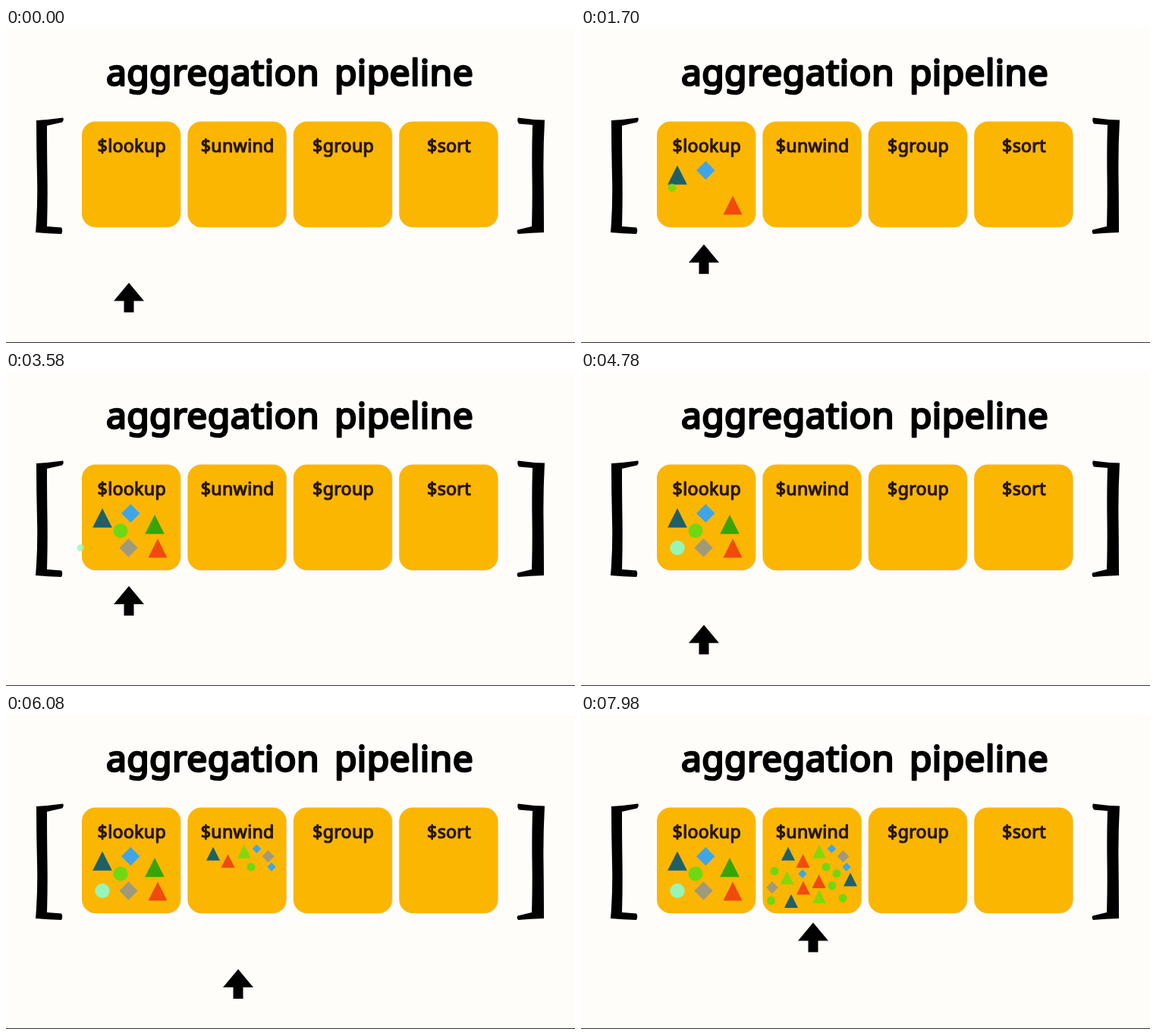
An HTML page for the animation above (8000 ms loop, 750 by 416 pixels).

```html
<!DOCTYPE html>
<html lang="en">
<head>
<meta charset="utf-8">
<title>Aggregation pipeline</title>
<style>
  html, body { margin: 0; width: 100%; height: 100%; overflow: hidden; background: #fefdfa; }
  svg { display: block; width: 100%; height: 100%; }
  text {
    font-family: "Noto Sans", "Open Sans", sans-serif;
    font-weight: 400;
    text-anchor: middle;
    stroke-linejoin: round;
  }
  .title { font-size: 48px; letter-spacing: .4px; word-spacing: 7px; fill: #000; stroke: #000; stroke-width: 2.6px; }
  .label { font-size: 23.2px; letter-spacing: .3px; fill: #26170a; stroke: #26170a; stroke-width: 1.2px; }
</style>
</head>
<body>
<svg id="stage" viewBox="0 0 750 416">
  <rect width="750" height="416" fill="#fefdfa"/>
  <rect y="415" width="750" height="1" fill="#333"/>
  <text class="title" x="374" y="75.5">aggregation pipeline</text>
  <path d="M40 122Q57 121 75 118.5Q77 121 74 124.5L54 129Q54 160 54.5 195T54 262L73 263.5Q75.5 267 73 272Q56 271.5 39 270Q42 235 41 197T40 122Z"/>
  <path d="M675 118.5Q692 121 710 121.5Q708 160 708.5 195T709 270Q692 270.5 675 272Q672.5 269 674.5 266.5L693 262Q694 230 693.5 195T694 128L676 126.5Q673 122 675 118.5Z"/>
  <g id="cards"></g>
  <g id="docs"></g>
  <path id="arrow" d="M0 0L20 24H6.5V39H-6.5V24H-20Z"/>
</svg>
<script>
const LOOP = 8000;
const NS = "http://www.w3.org/2000/svg";
const $ = id => document.getElementById(id);

function add(parent, tag, attrs, text) {
  const el = document.createElementNS(NS, tag);
  for (const key in attrs) el.setAttribute(key, attrs[key]);
  if (text) el.textContent = text;
  parent.appendChild(el);
  return el;
}

["$lookup", "$unwind", "$group", "$sort"].forEach((name, i) => {
  const x = 100 + i * 139.4;
  const box = { y: 123.5, width: 130, height: 139.5, rx: 18 };
  add($("cards"), "rect", { ...box, x: x + 0.8, y: 124, fill: "#dcd8c8" });
  add($("cards"), "rect", { ...box, x, fill: "#fbb602" });
  add($("cards"), "text", { class: "label", x: x + 65.8, y: 164 }, name);
});

// Unit outlines, scaled by the radius of each document.
const outline = {
  tri: "M0-1L1 1H-1Z",
  dia: "M0-1L1 0L0 1L-1 0Z",
  dot: "M-1 0A1 1 0 1 1 1 0A1 1 0 1 1-1 0Z"
};
const color = {
  blue: "#3ea6e8", red: "#f04a0e", teal: "#1f6068", lime: "#6fd813",
  green: "#37a408", leaf: "#86d60c", mint: "#98f5b8", gray: "#9f9a7c"
};
const docs = [];

function addDoc(shape, tint, x, y, r, fromX, start, span) {
  const el = add($("docs"), "path", { d: outline[shape], fill: color[tint] });
  docs.push({ el, x, y, r, fromX, start, span });
}

[
  ["dia", "blue", 164.3, 188, 12.2, 40],
  ["tri", "red", 200, 234, 12.5, 520],
  ["tri", "teal", 127, 194, 12.8, 1030],
  ["dot", "lime", 151, 211, 9.5, 1520],
  ["tri", "green", 196, 202.5, 12.8, 2020],
  ["dia", "gray", 161.5, 233.5, 12.2, 2700],
  ["dot", "mint", 127, 233.5, 9.7, 3440]
].forEach(([shape, tint, x, y, r, start]) =>
  addDoc(shape, tint, x, y, r, 73, start, 300));

const radius = { tri: 9, dot: 5.5, blue: 5.7, gray: 8 };
[
  ["tri", "teal", 273, 184.5], ["tri", "red", 292.5, 194],
  ["tri", "leaf", 314, 181.5], ["dia", "blue", 330.5, 178],
  ["dia", "gray", 345.5, 188], ["dot", "lime", 323, 202],
  ["dia", "blue", 350, 202], ["dot", "lime", 337, 210.5],
  ["tri", "teal", 355, 218.5], ["dot", "lime", 331, 226.5],
  ["tri", "red", 313.5, 221], ["dot", "lime", 255, 207.5],
  ["tri", "leaf", 271.5, 216], ["dia", "blue", 292, 211],
  ["tri", "red", 293, 229.5], ["dia", "gray", 252, 229],
  ["dot", "lime", 250.5, 246.5], ["tri", "teal", 277, 247],
  ["tri", "leaf", 314, 241], ["dot", "lime", 345, 243]
].forEach(([shape, tint, x, y], i) =>
  addDoc(shape, tint, x, y, radius[shape] || radius[tint], 205, 5090 + i * 138, 160));

const clamp = v => Math.min(1, Math.max(0, v));
const smooth = v => v * v * (3 - 2 * v);

function draw(t) {
  for (const d of docs) {
    const p = clamp((t - d.start) / d.span);
    const x = d.fromX + (d.x - d.fromX) * p;
    const size = d.r * (0.15 + 0.85 * Math.pow(p, 1.3));
    d.el.style.display = t < d.start ? "none" : "";
    d.el.setAttribute("opacity", 0.6 + 0.4 * p);
    d.el.setAttribute("transform", `translate(${x} ${d.y}) scale(${size})`);
  }

  // The bounce slows down slightly over the loop.
  const s = t / 1000;
  const turns = 0.083 + 1.516 * s - 0.0103 * s * s;
  const y = 308 + 33 * Math.cos(2 * Math.PI * turns);
  const x = 162 + 144 * smooth(clamp((t - 4820) / 280));
  $("arrow").setAttribute("transform", `translate(${x} ${y})`);
}

function tick() {
  draw(performance.now() % LOOP);
  requestAnimationFrame(tick);
}
tick();
</script>
</body>
</html>
```
